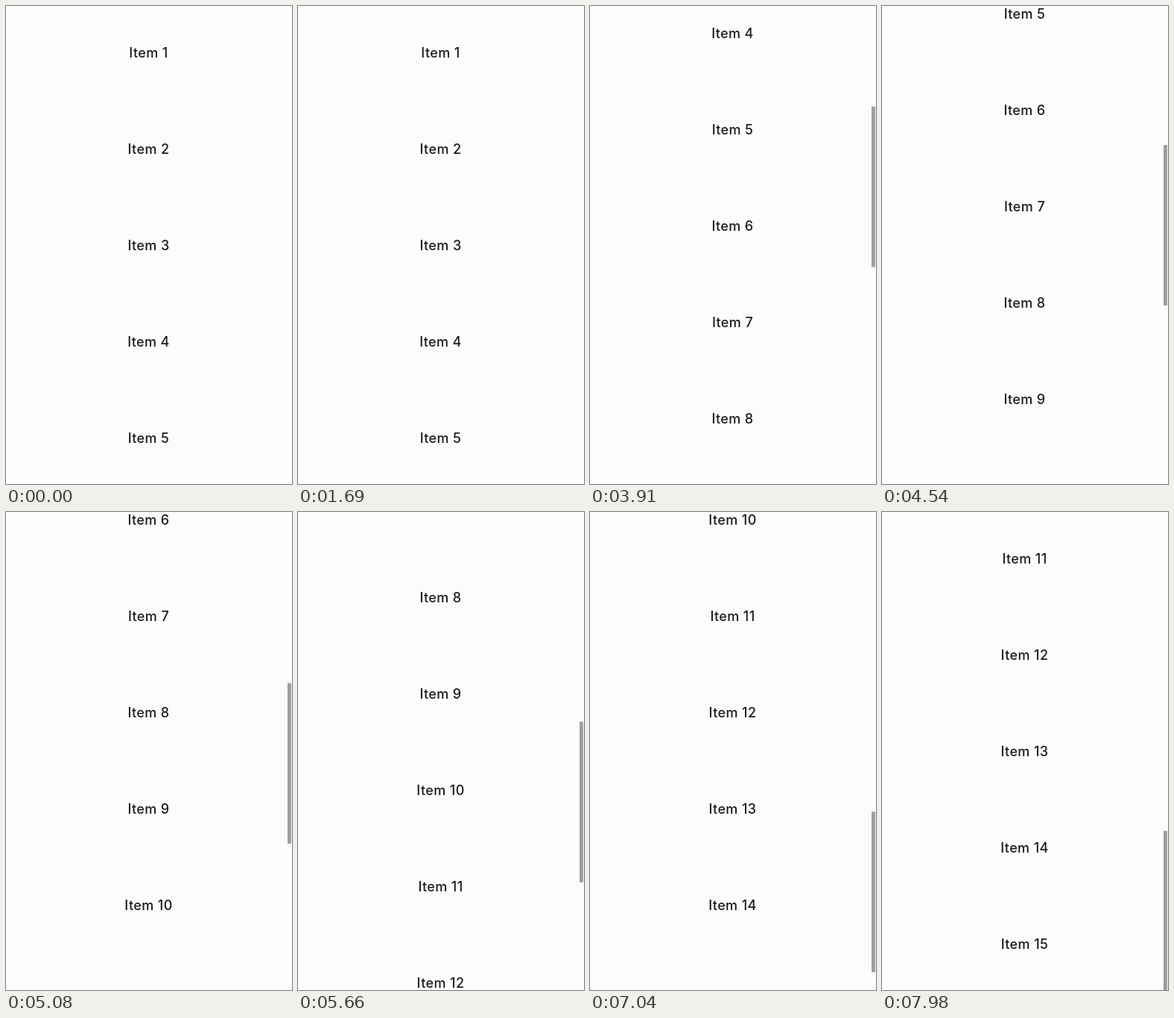
Recreate the animation shown at these times as an HTML page. Size 384 by 640 pixels, loop 8000 ms.

```html
<!DOCTYPE html>
<html lang="en">
<head>
<meta charset="utf-8">
<title>Auto-scrolling list</title>
<style>
  html, body { margin: 0; width: 100%; height: 100%; overflow: hidden; background: #fcfcfe; }
  #stage { position: relative; width: 384px; height: 640px; overflow: hidden; }
  #list { position: absolute; left: 0; top: -2px; width: 383px; }
  .item {
    height: 129px; text-align: center;
    font: 500 18px/129px Inter, "Open Sans", sans-serif;
    letter-spacing: .4px; color: #1c1a1c;
  }
  #thumb { position: absolute; left: 378px; top: -3px; width: 5px; height: 215px; background: #a09e9a; }
</style>
</head>
<body>
<div id="stage">
  <div id="list"></div>
  <div id="thumb"></div>
</div>
<script>
  const LOOP = 8000, ITEMS = 15, ROW = 129, VISIBLE = 5;
  const START = 2230, TICK = 102, TICKS = 50, FADE = 250;
  const travel = (ITEMS - VISIBLE) * ROW;
  const list = document.getElementById('list');
  const thumb = document.getElementById('thumb');

  for (let n = 1; n <= ITEMS; n++) {
    const item = document.createElement('div');
    item.className = 'item';
    item.textContent = `Item ${n}`;
    list.append(item);
  }

  const at = (ms, props) => ({ ...props, offset: ms / LOOP });
  const play = (el, frames) => el.animate(frames, { duration: LOOP, iterations: Infinity });

  // The list jumps by a fixed amount on every timer tick.
  function scroll(el, distance) {
    const rest = { transform: 'translateY(0px)' };
    const end = { transform: `translateY(${distance}px)` };
    play(el, [
      at(0, rest),
      at(START, { ...rest, easing: `steps(${TICKS}, end)` }),
      at(START + TICK * TICKS, end),
      at(LOOP, end)
    ]);
  }

  scroll(list, -travel);
  scroll(thumb, travel * VISIBLE / ITEMS);
  play(thumb, [
    at(0, { opacity: 0 }),
    at(START + TICK, { opacity: 0 }),
    at(START + TICK + FADE, { opacity: 1 }),
    at(LOOP, { opacity: 1 })
  ]);
</script>
</body>
</html>
```
